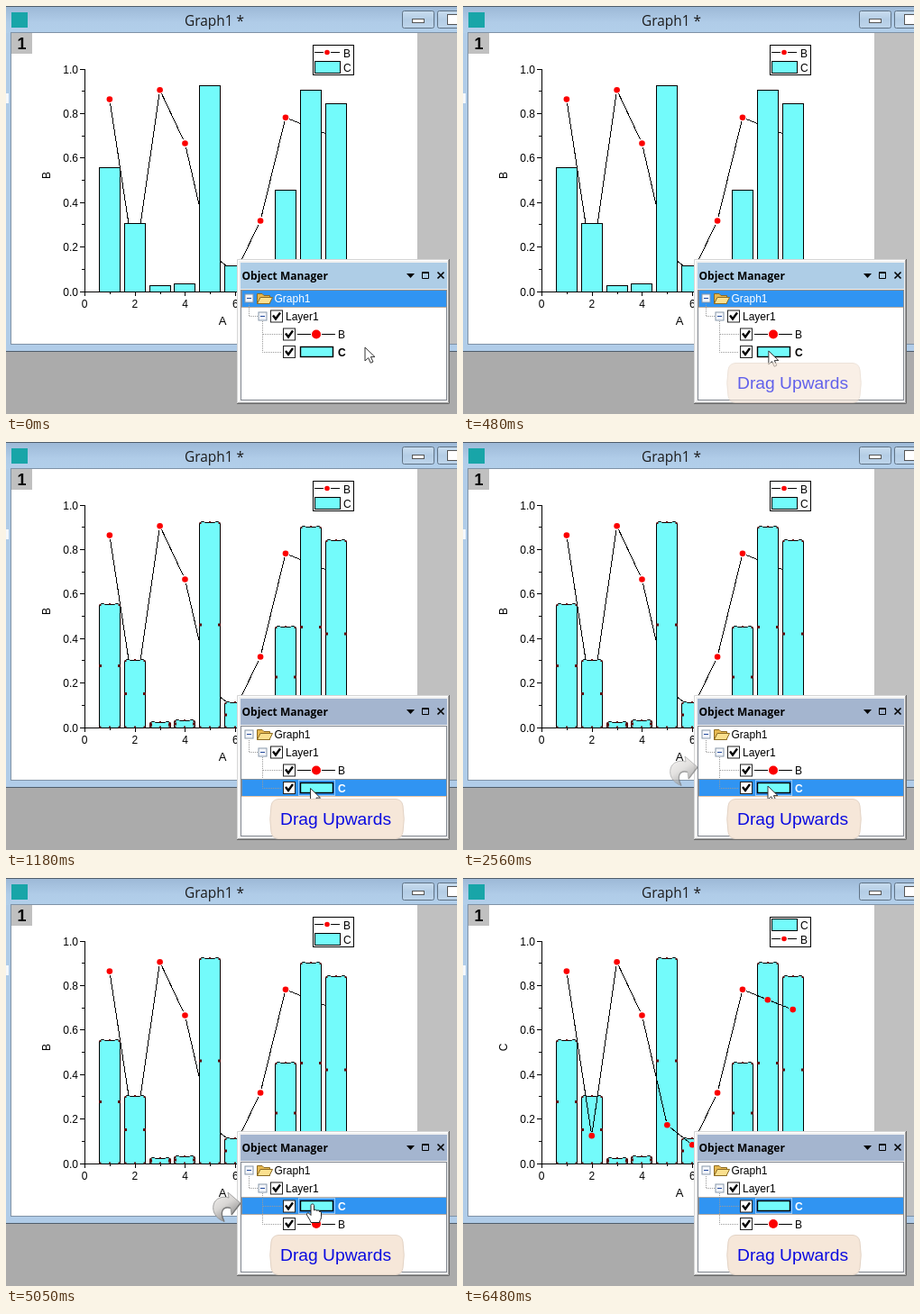
Write an HTML page that moves like this. It is 500 by 453 pixels and loops after 6.68 s.

```html
<!DOCTYPE html>
<html lang="en">
<head>
<meta charset="utf-8">
<title>Object Manager</title>
<style>
html, body { margin: 0; width: 100%; height: 100%; overflow: hidden; background: #ababab; }
svg { display: block; width: 100vw; height: 100vh; }
text { font-family: "Liberation Sans", Arial, sans-serif; font-size: 12px; }
.ui { font-family: "Open Sans", "Noto Sans", sans-serif; }
.bold { font-weight: bold; }
.crisp { shape-rendering: crispEdges; }
</style>
</head>
<body>
<svg id="stage" viewBox="0 0 500 453" preserveAspectRatio="none">
  <defs>
    <linearGradient id="bar" x2="0" y2="1">
      <stop offset="0" stop-color="#9cb8d6"/><stop offset=".6" stop-color="#b0cce8"/><stop offset="1" stop-color="#b2cfea"/>
    </linearGradient>
    <linearGradient id="btn" x2="0" y2="1">
      <stop offset="0" stop-color="#c9ddef"/><stop offset=".5" stop-color="#b4cde5"/><stop offset="1" stop-color="#bed5eb"/>
    </linearGradient>
    <linearGradient id="steel" x2=".6" y2="1">
      <stop offset="0" stop-color="#f4f2f0"/><stop offset=".5" stop-color="#d8d6d4"/><stop offset="1" stop-color="#858585"/>
    </linearGradient>
  </defs>

  <!-- graph window -->
  <rect width="500" height="453" fill="#ababab"/>
  <rect width="500" height="383" fill="#b0cce8"/>
  <rect width="500" height="30" fill="url(#bar)"/>
  <path d="M0 .5H500M0 383.5H500" stroke="#4f5d6b"/>
  <rect y="97" width="3" height="11" fill="#f4f8fc"/>
  <rect x="5" y="29" width="495" height="347" fill="#7f92a6"/>
  <rect x="6" y="30" width="494" height="345" fill="#c0c0c0"/>
  <rect x="6" y="30" width="450" height="345" fill="#fff"/>
  <rect x="6" y="7" width="18" height="17" fill="#18a5a8"/>
  <text class="ui" x="231" y="22" text-anchor="middle" style="font-size:15.4px" fill="#1c1c1c">Graph1 *</text>
  <g fill="url(#btn)" stroke="#5f7285">
    <rect x="439.5" y="5.5" width="35" height="19" rx="2"/>
    <rect x="478.5" y="5.5" width="35" height="19" rx="2"/>
    <rect x="450.5" y="14.5" width="13" height="4" fill="#fff" stroke="#555"/>
    <rect x="489.5" y="9.5" width="14" height="11" fill="#fff" stroke="#555"/>
  </g>
  <rect x="6" y="30" width="23" height="23" fill="#c0c0c0"/>
  <text class="bold" x="17.5" y="48" text-anchor="middle" style="font-size:18px">1</text>

  <g id="chart"></g>
  <g id="panel"></g>

  <g id="bend">
    <path d="M242 381.500C232 378 228.500 370 230 363C232 355 240 353 247 355L246 349L260 361L250 374L249 366.500C241 364 236 370 242 381.500Z" fill="url(#steel)" stroke="#8f8f8f" stroke-width=".8"/>
    <path d="M250 374L260 361M242 381.500C236 370 241 364 249 366.500" fill="none" stroke="#777" stroke-width="1.300"/>
  </g>
  <path id="drop" d="M263 354V374" stroke="#1c1ca8" stroke-width="3"/>
  <path id="arrow" d="M0 0V15L3.700 11.700L6.300 17.300L9 16L6.400 10.600H11Z" fill="#fff" stroke="#333" stroke-width="1"/>
  <path id="hand" d="M-1.500 1.500C-1.500 -.5 2 -.5 2 1.500V7C3 6 5 6 5 7.500C6 6.700 8 7 8 8.500C9 8 10 8.500 10 10V14.500C10 17 8 18 8 20.500H-1.500C-2 18 -5 14 -6 12C-6.500 9.500 -4 9.300 -3 11L-1.500 12.500Z" fill="#fff" stroke="#222"/>
  <g id="note">
    <path d="M302 396.500H432Q439 397 440 404Q442.500 419 440 433Q439 440 432 440.500H302Q295 440 294 433Q291.500 419 294 404Q295 397 302 396.500Z" fill="#f6e7d9" stroke="#e3d3c5"/>
    <text x="304" y="424.500" style="font-size:19.250px" fill="#0a0ae0">Drag Upwards</text>
  </g>
</svg>
<script>
const LOOP = 6680, CYAN = '#73fbfb', RED = '#fb0000', GRIP = '#5a0808';
const CLICK = 600, GRAB = 2900, SWAP = 5050, RELEASE = 5080;
const line = [.866, .127, .908, .668, .175, .086, .32, .784, .738, .694];
const bars = [.558, .304, .025, .036, .927, .115, .05, .457, .906, .846];
const $ = id => document.getElementById(id);
const px = a => 87 + 27.87 * a;
const py = v => 317.5 - 247 * v;

const rect = (x, y, w, h, fill, extra = '') =>
  `<rect x="${x}" y="${y}" width="${w}" height="${h}" fill="${fill}" ${extra}/>`;
const path = (d, extra = '') => `<path d="${d}" fill="none" stroke="#000" ${extra}/>`;
const dot = (x, y, r) => `<circle cx="${x}" cy="${y}" r="${r}" fill="${RED}"/>`;
const text = (x, y, s, extra = '') => `<text x="${x}" y="${y}" ${extra}>${s}</text>`;

function drawBar(v, i, picked) {
  const x = Math.round(px(i + 1) - 12) + .5, y = Math.round(py(v)) - .5, w = 23, h = 317.5 - y;
  if (!picked) return rect(x, y, w, h, CYAN, 'stroke="#000"');
  const c = Math.min(2, h / 3);
  const body = `M${x} 317.5V${y + c}l2 ${-c}h3l1 1h${w - 12}l1 -1h3l2 ${c}V317.5Z`;
  const grip = (gx, gy, s = 3) => rect(gx - s / 2, gy - s / 2, s, s, GRIP);
  const [l, m, r] = [x + 1, x + w / 2, x + w - 1], mid = y + h / 2;
  return `<path d="${body}" fill="${CYAN}" stroke="#000"/>` +
    grip(l, mid) + grip(r, mid) + grip(m, y + .5, 2) + grip(m, 316.5, 2) +
    [l, r].map(gx => grip(gx, y + 1.5, 2) + grip(gx, 316.5, 2)).join('');
}

function drawLine() {
  const pts = line.map((v, i) => [px(i + 1), py(v)]);
  let d = '';
  pts.slice(1).forEach(([x, y], i) => {
    const [a, b] = pts[i], k = 4.5 / Math.hypot(x - a, y - b);
    d += `M${a + (x - a) * k} ${b + (y - b) * k}L${x - (x - a) * k} ${y - (y - b) * k}`;
  });
  return path(d, 'class="crisp"') + pts.map(p => dot(...p, 3.3)).join('');
}

function drawAxes(name) {
  let d = 'M87.5 70V317.5H394', s = '';
  for (let i = 0; i <= 10; i++) {
    const y = Math.round(py(i / 10)) - .5, x = Math.round(px(i)) + .5, n = i % 2 ? 3 : 5;
    d += `M87 ${y}h${-n}M${x} 317v${n}`;
    if (i % 2) continue;
    s += text(80, y + 4.5, (i / 10).toFixed(1), 'text-anchor="end"');
    s += text(px(i), 335, i, 'text-anchor="middle"');
  }
  return path(d) + s + text(240, 354, 'A', 'text-anchor="middle" style="font-size:13px"') +
    text(0, 0, name, 'transform="translate(49 188) rotate(-90)" text-anchor="middle"');
}

function drawLegend(barFirst) {
  const yb = barFirst ? 45.5 : 61.5, yl = barFirst ? 68 : 52;
  return rect(340.5, 43.5, 45, 33, '#fff', 'stroke="#000"') +
    rect(342.5, yb, 28, 13, CYAN, 'stroke="#000"') + text(374, yb + 11, 'C') +
    path(`M342 ${yl - .5}h10M360 ${yl - .5}h10`) + dot(356, yl - .5, 2.8) + text(374, yl + 4.5, 'B');
}

function drawChart(picked, barFirst) {
  const cols = bars.map((v, i) => drawBar(v, i, picked)).join('');
  const layers = barFirst ? cols + drawLine() : drawLine() + cols;
  return drawAxes(barFirst ? 'C' : 'B') + layers + drawLegend(barFirst);
}

const check = (x, y) => rect(x - 6.5, y - 6.5, 13, 13, '#fff', 'stroke="#222"') +
  path(`M${x - 4} ${y - 1}l3 4l5 -7`, 'stroke-width="2.4"');
const minus = (x, y) => rect(x - 4.5, y - 4.5, 9, 9, '#f4f6fa', 'stroke="#8797aa"') +
  path(`M${x - 2.5} ${y}h5`, 'style="stroke:#234a9c"');

// Raised tool window edge with title bar and sunken list
const drawFrame = title =>
  rect(256, 281, 236, 161, '#f0f0f0') +
  path('M256.500 441V281.500H491', 'style="stroke:#d4d4d4"') +
  path('M257.500 440V282.500H490', 'style="stroke:#fff"') +
  path('M256 441.500H491.500V281', 'style="stroke:#696969"') +
  path('M257 440.500H490.500V282', 'style="stroke:#a0a0a0"') +
  rect(260, 285, 229, 29, title) +
  rect(260.5, 315.5, 228, 122, '#fff', 'stroke="#828790"');

function drawPanel(picked, swapped) {
  const yc = swapped ? 364.5 : 384, yb = swapped ? 384 : 364.5;
  const hot = picked ? yc - 10 : 315.5;
  const ink = on => `fill="${on ? '#fff' : '#000'}"`;
  return drawFrame(picked ? '#a4b5cf' : '#aecde6') +
    text(261.5, 304, 'Object Manager', 'class="ui bold"') +
    '<path d="M444 297h9l-4.500 5Z"/>' +
    path('M461.500 295.500h7v7h-7ZM461 296.500h8') +
    path('M478.500 295.500l7 7m0 -7l-7 7', 'stroke-width="1.600"') +
    rect(261, hot, 228, 19, '#3094f2') +
    rect(261.5, Math.floor(hot) + .5, 227, 19, 'none', 'stroke="#d08a48" stroke-dasharray="1 1"') +
    path('M269.500 331V344.500H279M284.500 350V384.500H306M285 364.500H306',
      'style="stroke:#999" stroke-dasharray="1 1"') +
    minus(269.5, 324.5) + minus(284.5, 344.5) +
    '<path d="M278.500 330.500V319.500H284L286 321.500H292.500V330.500Z" fill="#e6b850" stroke="#8c6a22"/>' +
    '<path d="M278.500 330.500L282 323.500H295.500L292 330.500Z" fill="#fbe08e" stroke="#8c6a22"/>' +
    text(297.5, 329, 'Graph1', ink(!picked)) +
    check(300, 344.5) + text(310, 349, 'Layer1') +
    check(314, yb) + path(`M323 ${Math.floor(yb) + .5}h15m12 0h15`) + dot(344, yb, 5) +
    text(368, yb + 4.5, 'B') +
    check(314, yc) +
    (picked ? rect(324.5, Math.floor(yc) - 8.5, 40, 17, 'none', 'stroke="#fff" stroke-dasharray="1 1"') : '') +
    rect(326.5, Math.floor(yc) - 5.5, 36, 11, CYAN, 'stroke="#000" stroke-width="1.4"') +
    text(368, yc + 4.5, 'C', 'class="bold" ' + ink(picked));
}

// Waypoints: time, x, y of the pointer tip
const route = [
  [0, 398, 379], [30, 398, 379], [450, 339, 383], [690, 338, 383], [1150, 338, 383],
  [1180, 337.5, 384.5], [2080, 337.5, 384.5], [2110, 338, 382], [2770, 338, 382],
  [2900, 339, 374], [3040, 339.5, 367], [3200, 339.5, 367], [3230, 339.5, 366], [3460, 339.5, 366],
  [3490, 339.5, 364], [3660, 339.5, 364], [3720, 339.5, 362], [6040, 339.5, 362], [6480, 455, 456]
];
const clamp = v => Math.max(0, Math.min(1, v));
const ramp = (t, a, b) => clamp((t - a) / (b - a));

function tip(t) {
  if (t >= 6480) return [455, 456];
  const i = Math.max(1, route.findIndex(p => p[0] > t));
  const [a, x, y] = route[i - 1], [b, u, v] = route[i], k = ramp(t, a, b);
  return [x + (u - x) * k, y + (v - y) * k];
}

let state = '';
function update(t) {
  const picked = t >= CLICK, swapped = t >= SWAP, redrawn = t >= RELEASE;
  const key = [picked, swapped, redrawn].join();
  if (key !== state) {
    state = key;
    $('chart').innerHTML = drawChart(picked, redrawn);
    $('panel').innerHTML = drawPanel(picked, swapped);
  }
  const drag = t >= GRAB && t < RELEASE;
  const show = (id, on) => $(id).setAttribute('visibility', on ? 'visible' : 'hidden');
  show('hand', drag);
  show('arrow', !drag && t < 6480);
  show('drop', t >= GRAB && !swapped);
  const at = `translate(${tip(t)})`;
  $('hand').setAttribute('transform', at);
  $('arrow').setAttribute('transform', at);
  $('note').setAttribute('opacity', ramp(t, 0, 750));
  $('bend').setAttribute('opacity', ramp(t, 2050, 2770) * (1 - ramp(t, 5350, 6070)));
}

const start = performance.now();
function tick() {
  update((performance.now() - start) % LOOP);
  requestAnimationFrame(tick);
}
tick();
</script>
</body>
</html>
```
